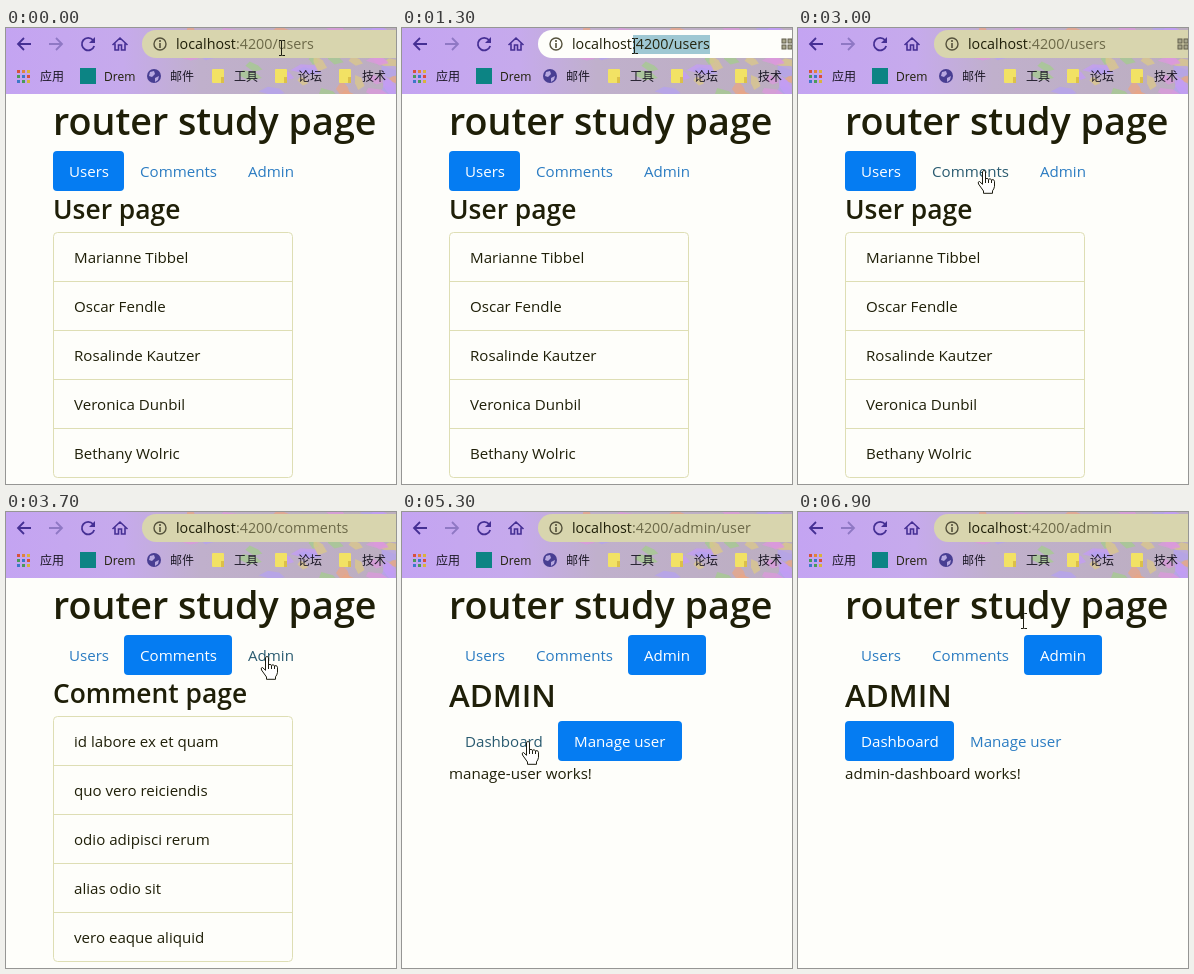
An HTML page that plays this animation: 390 by 456 pixels, repeating every 7 s.

```html
<!DOCTYPE html>
<html lang="en">
<head>
<meta charset="utf-8">
<title>router study page</title>
<style>
  html, body { margin: 0; width: 100%; height: 100%; overflow: hidden; background: #fefefa; }
  svg { display: block; width: 390px; height: 456px; }
  text { font: 15.1px "Open Sans", "Noto Sans", sans-serif; fill: #1f1f08; white-space: pre; }
  .h1 { font-size: 37.7px; font-weight: 600; }
  .h2 { font-size: 31.4px; font-weight: 600; }
  .h3 { font-size: 26.4px; font-weight: 600; }
  .url { font-size: 14.3px; }
  .mark { font: 12px "Noto Sans CJK SC", "Noto Sans CJK", sans-serif; fill: #1c1826; }
  .link { fill: #2b7cc2; }
  .hover { fill: #2a5b70; }
  .on { fill: #fff; }
  .pill { fill: #057cf2; }
  .line { fill: none; stroke: #dedeb4; }
</style>
</head>
<body>
<svg viewBox="0 0 390 456">
  <defs>
    <linearGradient id="sky">
      <stop offset="0" stop-color="#c4a4f2"/>
      <stop offset=".3" stop-color="#c6aaec"/>
      <stop offset=".5" stop-color="#c0b0cc"/>
      <stop offset="1" stop-color="#bcaec0"/>
    </linearGradient>
    <clipPath id="bar"><rect width="390" height="66"/></clipPath>
  </defs>
  <rect width="390" height="456" fill="#fefefa"/>
  <g clip-path="url(#bar)">
    <rect width="390" height="66" fill="url(#sky)"/>
    <g id="blobs"></g>
  </g>
  <g id="bookmarks"></g>
  <g fill="none" stroke="#452f94" stroke-width="1.8">
    <path d="M25 16H12M18 10l-6 6 6 6"/>
    <path d="M43 16h13M50 10l6 6-6 6" stroke="#8f78c4"/>
    <path d="M87 12a6.3 6.3 0 1 0 1.2 6"/>
    <path d="M106.500 17l7.500-7 7.500 7M109 15.500V22h3.500v-5h3v5h3.500v-6.500" stroke-width="1.600"/>
  </g>
  <path d="M89 9v6h-6z" fill="#452f94"/>
  <text class="h1" x="47" y="107">router study page</text>
  <g id="live"></g>
</svg>
<script>
const LOOP = 7000, STEP = 100;
const $ = id => document.getElementById(id);

const rect = (x, y, w, h, attrs = '') =>
  `<rect x="${x}" y="${y}" width="${w}" height="${h}" ${attrs}/>`;
const text = (x, y, str, cls = '', attrs = '') =>
  `<text x="${x}" y="${y}" class="${cls}" ${attrs}>${str}</text>`;

// Cursor hotspot: time, x, y
const PATH = [
  [0, 276, 20], [300, 276, 20], [600, 308, 18], [1200, 233, 18], [1500, 233, 18],
  [2200, 133, 150], [2400, 133, 150], [2800, 187, 142], [3200, 187, 142],
  [3600, 262, 144], [3900, 262, 144], [4300, 219, 235], [4700, 219, 235],
  [5200, 127, 229], [5700, 127, 229], [6300, 190, 228], [6600, 225, 213],
  [6700, 225, 213], [6900, 226, 109], [LOOP, 226, 109]
];
const ROUTES = [[0, 'users'], [3100, 'comments'], [3800, 'admin'], [4600, 'admin/user'], [5500, 'admin']];
const FOCUS = [600, 2900];
const SELECT_END = 308;

const PEOPLE = ['Marianne Tibbel', 'Oscar Fendle', 'Rosalinde Kautzer', 'Veronica Dunbil', 'Bethany Wolric'];
const REMARKS = ['id labore ex et quam', 'quo vero reiciendis', 'odio adipisci rerum', 'alias odio sit', 'vero eaque aliquid'];

const TABS = [['Users', 47, 71], ['Comments', 118, 108], ['Admin', 226, 78]];
const SUBTABS = [['Dashboard', 47, 109], ['Manage user', 156, 124]];

// Angular patches of the browser theme, denser to the right
function drawBlobs() {
  let seed = 11;
  const rnd = () => (seed = seed * 16807 % 2147483647) / 2147483647;
  const colors = ['#dc98dc', '#a4cc8c', '#eaa684', '#c39cf6', '#dcc888', '#b4a2f0'];
  let out = '';
  for (let i = 0; i < 44; i++) {
    const x = 180 + 210 * Math.sqrt(rnd()), y = 66 * rnd();
    const w = 5 + 9 * rnd(), h = 3 + 6 * rnd();
    out += `<path d="M${x - w} ${y}l${w * rnd()} ${-h} ${w} ${h * rnd()} ${w / 2} ${h} ${-w} ${h / 2}z"
      fill="${colors[i % colors.length]}" opacity=".75"/>`;
  }
  return out;
}

function drawBookmarks() {
  const dots = ['#d8503c', '#e0843c', '#d9b23c', '#4a9a58', '#3c78c8', '#d8503c', '#3c78c8', '#4a9a58', '#d9b23c'];
  let out = dots.map((c, i) => rect(11 + i % 3 * 5, 42 + (i / 3 | 0) * 5, 3, 3, `fill="${c}"`)).join('');
  out += rect(74, 40, 16, 16, 'fill="#0c8484"');
  out += '<circle cx="148" cy="48" r="7" fill="#483e92"/>' +
    '<path d="M144 44l4-1 1 3-3 3-3-1zM149 50l4-2-1 4-3 2z" fill="#b7a8e0"/>';
  for (const x of [206, 269, 333]) {
    out += rect(x, 41, 12, 14, 'rx="1" fill="#f2e264"') + rect(x + 9, 49, 3, 6, 'fill="#dcc048"');
  }
  const labels = [[34, '应用'], [164, '邮件'], [228, '工具'], [292, '论坛'], [356, '技术']];
  out += labels.map(([x, s]) => text(x, 53, s, 'mark')).join('');
  return out + text(98, 53, 'Drem', '', 'style="font-size:12px"');
}

function drawAddress(t, x, route) {
  const focused = t >= FOCUS[0] && t < FOCUS[1];
  let out = rect(136, 2, 290, 28, `rx="14" fill="${focused ? '#fefefa' : '#d8d5ae'}"`);
  if (focused) {
    const left = t < 1200 ? Math.max(231, x) : 231;
    out += rect(left, 7, SELECT_END - left, 19, 'fill="#9fc8d3"');
  }
  out += '<circle cx="154" cy="16" r="6" fill="none" stroke="#55523c" stroke-width="1.4"/>' +
    '<path d="M154 12v2M154 15v5" stroke="#55523c" stroke-width="1.600"/>';
  out += text(170, 21, `localhost<tspan fill="${focused ? '#25250f' : '#6c6948'}">:4200/${route}</tspan>`, 'url');
  if (t >= FOCUS[0] && t < 3100) {
    for (const [qx, qy] of [[380, 11], [386, 11], [380, 17], [386, 17]]) {
      out += rect(qx, qy, 4, 4, 'fill="#a8a68c" stroke="#625f4c"');
    }
  }
  return out;
}

const inside = (x, y, [, left, width], top) =>
  x >= left && x < left + width && y >= top && y < top + 40;

function drawTabs(tabs, top, active, x, y) {
  return tabs.map((tab, i) => {
    const [label, left, width] = tab;
    const cls = i === active ? 'on' : inside(x, y, tab, top) ? 'hover' : 'link';
    const pill = i === active ? rect(left, top, width, 40, 'rx="4" class="pill"') : '';
    return pill + text(left + 16, top + 26, label, cls);
  }).join('');
}

function drawList(title, items) {
  let out = text(47, 191, title, 'h3') + rect(47.5, 204.5, 239, 245, 'rx="4" class="line"');
  items.forEach((item, i) => {
    if (i) out += `<path class="line" d="M47 ${204.5 + 49 * i}h240"/>`;
    out += text(68, 235 + 49 * i, item);
  });
  return out;
}

function drawPage(route, x, y) {
  if (route === 'users') return drawTabs(TABS, 123, 0, x, y) + drawList('User page', PEOPLE);
  if (route === 'comments') return drawTabs(TABS, 123, 1, x, y) + drawList('Comment page', REMARKS);
  const sub = route === 'admin' ? 0 : 1;
  return drawTabs(TABS, 123, 2, x, y) + text(47, 195, 'ADMIN', 'h2') +
    drawTabs(SUBTABS, 209, sub, x, y) +
    text(47, 267, sub ? 'manage-user works!' : 'admin-dashboard works!');
}

const CURSORS = {
  beam: '<path d="M-3-7.500h2.500l.5.500.500-.5H3M-.5-7V7M-3 7.500h2.500L0 7l.500.500H3" fill="none" stroke="#1c1c10"/>',
  hand: '<path d="M-2.500 1.500Q-1-.8.500 1.500V9q1.500-1.600 3 .3 1.600-1.300 3 .5 2.500-1 3 1.500v5q-.5 3-2 4.500v2.500H-1.500V21L-6.500 14q-1-2.500 1-2.500l3 2.800z" fill="#fff" stroke="#1c1c10"/>' +
    '<path d="M.5 9v4M3.500 9.500V13M6.500 10v3" stroke="#1c1c10"/>',
  arrow: '<path d="M0 0v16l3.800-3.500 2.500 6 2.500-1-2.500-5.800H11z" fill="#fff" stroke="#1c1c10"/>'
};

function cursorKind(x, y, route) {
  const onTab = TABS.some(tab => inside(x, y, tab, 123));
  const onSub = route.startsWith('admin') && SUBTABS.some(tab => inside(x, y, tab, 209));
  if (onTab || onSub) return 'hand';
  return y < 31 || (y > 71 && y < 119 && x > 47 && x < 370) ? 'beam' : 'arrow';
}

function cursorAt(t) {
  const i = PATH.findIndex(p => p[0] > t);
  const [t0, x0, y0] = PATH[i - 1], [t1, x1, y1] = PATH[i];
  const k = (t - t0) / (t1 - t0);
  return [Math.round(x0 + (x1 - x0) * k), Math.round(y0 + (y1 - y0) * k)];
}

function render(t) {
  const [x, y] = cursorAt(t);
  const route = ROUTES.filter(r => r[0] <= t).pop()[1];
  $('live').innerHTML = drawAddress(t, x, route) + drawPage(route, x, y) +
    `<g transform="translate(${x} ${y})">${CURSORS[cursorKind(x, y, route)]}</g>`;
}

$('blobs').innerHTML = drawBlobs();
$('bookmarks').innerHTML = drawBookmarks();

const start = performance.now();
let shown = -1;
function tick() {
  const t = Math.floor((performance.now() - start) % LOOP / STEP) * STEP;
  if (t !== shown) render(shown = t);
  requestAnimationFrame(tick);
}
tick();
</script>
</body>
</html>
```
